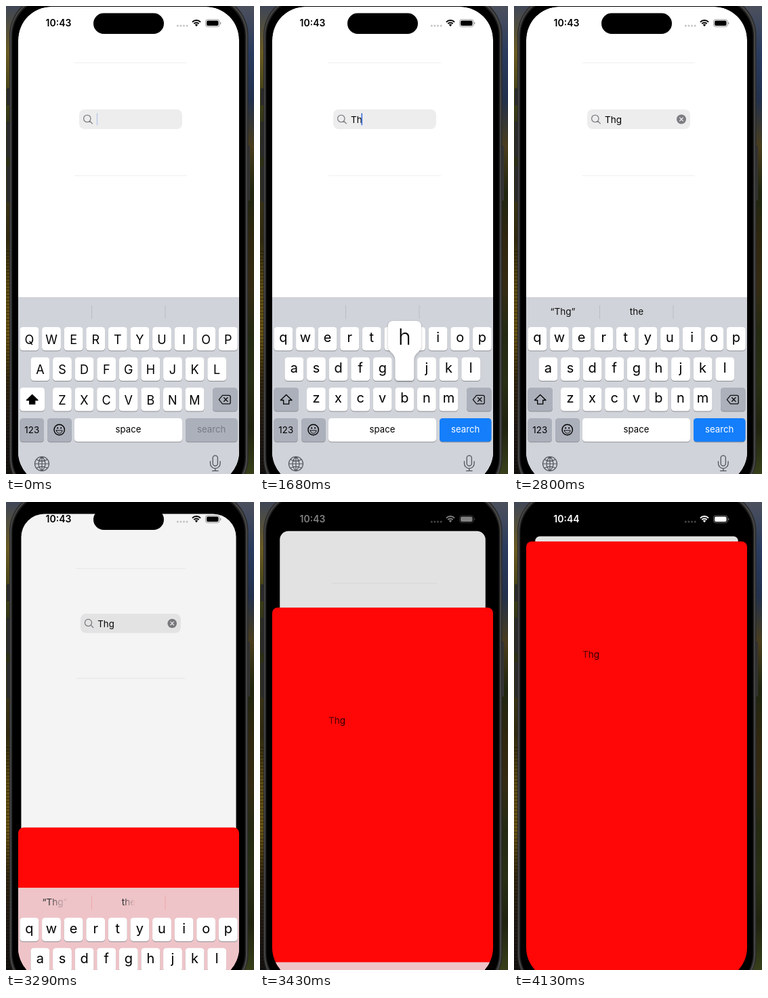
These frames come from a looping animation (366x688 px, 5.18 s). An HTML page with a canvas:

```html
<!DOCTYPE html>
<html lang="en">
<head>
<meta charset="utf-8">
<title>Search to sheet</title>
<style>
  html, body { margin: 0; width: 100%; height: 100%; overflow: hidden; background: #000; }
  canvas { display: block; width: 366px; height: 688px; }
</style>
</head>
<body>
<canvas id="stage"></canvas>
<script>
const W = 366, H = 688, LOOP = 5180, STEP = 70;
const canvas = document.getElementById('stage');
const g = canvas.getContext('2d');
const dpr = window.devicePixelRatio || 1;
canvas.width = W * dpr;
canvas.height = H * dpr;

const SCREEN = { x: 18, y: 1, w: 326, h: 703, r: 49 };
const KEY_W = 27.8, KEY_H = 34.5, PITCH = 32.6;
const ROWS = [['QWERTYUIOP', 20.5, 472], ['ASDFGHJKL', 36.5, 516.5], ['ZXCVBNM', 69, 561]];
const CURSOR = [[0, .25], [350, 0], [700, .7], [770, .85], [840, 1], [1120, .9], [1330, 1],
  [2590, .75], [2660, .5], [2730, .25], [2800, 0], [3010, .4], [3080, 1], [3220, 0]];

const clamp = v => Math.min(1, Math.max(0, v));
const ramp = (t, from, to) => clamp((t - from) / (to - from));

// Critically damped spring from 0 to 1.
function spring(t, start) {
  if (t >= 3780) return 1;
  const x = Math.max(0, t - start) * .01535;
  return 1 - (1 + x) * Math.exp(-x);
}

// Value of the last step that has begun.
const stepped = (steps, t) => steps.filter(s => s[0] <= t).pop()[1];

function rect(x, y, w, h, color, r = 0) {
  g.fillStyle = color;
  g.beginPath();
  g.roundRect(x, y, w, h, r);
  g.fill();
}

function disc(x, y, r, color) {
  g.fillStyle = color;
  g.beginPath();
  g.arc(x, y, r, 0, 7);
  g.fill();
}

function text(str, x, y, size, color, align = 'center', weight = 400) {
  g.font = `${weight} ${size}px Inter, sans-serif`;
  g.textAlign = align;
  g.fillStyle = color;
  g.fillText(str, x, y);
}

function stroke(path, color, width) {
  g.strokeStyle = color;
  g.lineWidth = width;
  g.lineCap = g.lineJoin = 'round';
  g.stroke(new Path2D(path));
}

function gradient(x0, y0, x1, y1, colors) {
  const fill = g.createLinearGradient(x0, y0, x1, y1);
  colors.forEach((c, i) => fill.addColorStop(i / (colors.length - 1), c));
  return fill;
}

function drawBackdrop() {
  rect(0, 0, 183, H, gradient(0, 0, 0, H, ['#3f4656', '#6a5a22', '#3f3f18', '#272d14', '#3a3417',
    '#30290f', '#5f4d14', '#6b5515', '#33270f', '#221a14', '#15120f']));
  rect(183, 0, 183, H, gradient(0, 0, 0, H, ['#4c505c', '#293b5f', '#22304c', '#4a3d1c', '#20260f',
    '#30270f', '#352b13', '#242a12', '#282f14', '#20230f', '#37401a']));
  for (let y = 360; y < H; y += 5) rect(0, y, 6, 1.5, 'rgba(0,0,0,.35)');
}

function drawPhone() {
  for (const [y, h] of [[121, 25], [170, 52], [236, 52]]) rect(1, y, 6, h, '#2b2b2b', 1);
  rect(354, 205, 6, 81, '#343434', 1);
  rect(5, -16, 352.5, 740, '#292929', 59);
  rect(6.2, -14.8, 350, 738, '#454545', 58);
  rect(8, -13, 346, 734, '#1d1d1d', 57);
  rect(9.5, -11, 343, 730, '#000', 56);
}

function drawCard(t, p) {
  const s = 1 - .082 * p, radius = SCREEN.r - 42 * p;
  g.save();
  g.translate(181, 1 + 49.5 * p);
  g.scale(s, s);
  g.translate(-181, -1);
  g.save();
  rect(18, 1, 326, 720, '#fff', radius);
  g.clip();
  rect(101, 83, 166, 1, '#efefef');
  rect(101, 249, 166, 1, '#efefef');
  rect(108, 152, 152, 29, '#ededee', 8);
  stroke('M125 165.5a5.2 5.2 0 1 0-10.4 0a5.2 5.2 0 1 0 10.4 0M123.7 169.3l3.6 3.5', '#7f7f84', 1.3);

  const typed = stepped([[0, ''], [1680, 'Th'], [2240, 'Thg']], t);
  text(typed, 134, 172, 13.6, '#000', 'left');
  g.globalAlpha = stepped(CURSOR, t);
  rect(133.7 + [0, 0, 15.8, 24][typed.length], 157.5, 1.6, 18, '#3a70dc', .8);
  g.globalAlpha = ramp(t, 1750, 1890);
  disc(247, 166.5, 7, '#7d7d82');
  stroke('M244.6 164.1l4.8 4.8M249.4 164.1l-4.8 4.8', '#f2f2f3', 1.3);
  g.globalAlpha = Math.min(.115, .135 * p);
  rect(18, 1, 326, 720, '#000');
  g.restore();
  g.restore();
}

function drawSheet(top) {
  rect(18, top, 326, H + 40 - top, '#ff0706', [8, 8, 0, 0]);
  text('Thg', 101, top + 170.6, 13.6, gradient(101, 0, 126, 0, ['#7a0404', '#300202', '#280202']), 'left');
}

function drawKey(x, y, w, color = '#fff') {
  rect(x, y + 1, w, KEY_H, '#8b8d92', 4.5);
  rect(x, y, w, KEY_H, color, 4.5);
}

function drawPopup(letter, x, y) {
  const cx = x + KEY_W / 2, half = KEY_W / 2, top = y - 53.5, bottom = y + KEY_H;
  g.save();
  g.shadowColor = 'rgba(0,0,0,.28)';
  g.shadowBlur = 3;
  g.shadowOffsetY = 1;
  g.fillStyle = '#fff';
  g.beginPath();
  g.moveTo(cx - 18, top);
  g.arcTo(cx + 24.5, top, cx + 24.5, y, 7);
  g.lineTo(cx + 24.5, y - 17);
  g.bezierCurveTo(cx + 24.5, y - 6, cx + half, y - 8, cx + half, y + 5);
  g.arcTo(cx + half, bottom, cx, bottom, 4.5);
  g.arcTo(cx - half, bottom, cx - half, y, 4.5);
  g.lineTo(cx - half, y + 5);
  g.bezierCurveTo(cx - half, y - 8, cx - 24.5, y - 6, cx - 24.5, y - 17);
  g.arcTo(cx - 24.5, top, cx, top, 7);
  g.fill();
  g.restore();
  text(letter, cx, y - 18.5, 32, '#000', 'center', 300);
}

function drawPredictions(t) {
  const leaving = t >= 3220;
  const ink = (x0, x1) => leaving
    ? gradient(x0, 0, x1, 0, ['#222', '#333', '#a68e93', '#f0bcc0']) : '#111';
  const divider = leaving ? '#f0a5aa' : '#b9bdc4';
  rect(126, 440, 1, 20, divider);
  rect(234.5, 440, 1, 20, divider);
  g.globalAlpha = ramp(t, 1890, 2100);
  text(t < 2380 ? '“Th”' : '“Thg”', 72, 454, 13.6, ink(52, 92));
  text('the', 181, 454, 13.6, ink(167, 190));
  g.globalAlpha = 1;
}

function drawIcons(upper) {
  const arrow = 'M38.7 571.5l8.3 8h-4.3v5.7h-8v-5.7h-4.3z';
  stroke(arrow, '#000', 1.3);
  if (upper) {
    g.fillStyle = '#000';
    g.fill(new Path2D(arrow));
  }
  stroke('M319.5 572.3h9.5q2.2 0 2.2 2.2v8.2q0 2.2-2.2 2.2h-9.5l-5.2-6.3z'
    + 'M321.6 575.8l5.4 5.5M327 575.8l-5.4 5.5', '#111', 1.3);

  stroke('M86.4 623a7.7 7.7 0 1 0-15.4 0a7.7 7.7 0 1 0 15.4 0', '#000', 1.4);
  disc(76.2, 620.4, 1.1, '#000');
  disc(81.2, 620.4, 1.1, '#000');
  stroke('M74.2 624h9q-.8 4.2-4.5 4.2t-4.5-4.2z', '#000', .9);

  const grey = '#52565d';
  stroke('M63.5 673a10.5 10.5 0 1 0-21 0a10.5 10.5 0 1 0 21 0M42.5 673h21M53 662.5v21'
    + 'M53 662.5q-10 10.5 0 21q10-10.5 0-21M45 666.7q8 4.4 16 0M45 679.3q8-4.4 16 0', grey, 1.2);
  stroke('M305.2 664.4a3.6 3.6 0 0 1 7.2 0v8a3.6 3.6 0 0 1-7.2 0z'
    + 'M301.5 669.5v3a7.3 7.3 0 0 0 14.6 0v-3M308.8 680v3.3M304.5 683.3h8.6', grey, 1.3);
}

function drawKeyboard(t, offset, sheetTop) {
  const upper = t < 1680;
  const pressed = stepped([[0, ''], [1330, 'T'], [1680, 'H'], [1820, ''], [2100, 'G'], [2240, '']], t);
  const top = 428 + offset;
  rect(18, top, 326, 300, '#d0d3d9');
  if (sheetTop < H) rect(18, Math.max(top, sheetTop), 326, 300, '#eec4c8');

  g.save();
  g.translate(0, offset);
  drawPredictions(t);
  let popup = null;
  for (const [letters, left, y] of ROWS) {
    [...letters].forEach((letter, i) => {
      const x = left + i * PITCH, label = upper ? letter : letter.toLowerCase();
      drawKey(x, y, KEY_W);
      text(label, x + KEY_W / 2, y + (upper ? 24.6 : 22.4), upper ? 18 : 20, '#000');
      if (letter === pressed) popup = [label, x, y];
    });
  }
  const dark = '#abb0bb';
  drawKey(20.5, 561, 36.5, upper ? '#fff' : dark);
  drawKey(305, 561, 36.5, dark);
  drawKey(20.5, 606, 35.5, dark);
  drawKey(61, 606, 35.8, dark);
  drawKey(101, 606, 159, '#fff');
  text('123', 38.3, 627.6, 13.4, '#000');
  text('space', 180.5, 626.8, 13.2, '#000');
  const held = t >= 3010 && t < 3220;
  drawKey(265, 606, 76.5, upper ? dark : held ? '#fff' : '#147efb');
  text('search', 303.2, 626.8, 13.2, upper ? '#777b83' : held ? '#000' : '#fff');
  drawIcons(upper);
  if (popup) drawPopup(...popup);
  g.restore();
}

function drawStatus(t) {
  const light = ramp(t, 3360, 3500);
  const level = Math.round(255 * light);
  const color = `rgb(${level},${level},${level})`;
  text(t < 4130 ? '10:43' : '10:44', 77.5, 30.3, 14, color, 'center', 600);
  for (let i = 0; i < 4; i++) disc(253.3 + i * 4.6, 29, 1.5, light ? '#454545' : '#c4c4c4');

  g.strokeStyle = color;
  g.lineWidth = 2;
  g.lineCap = 'butt';
  for (const r of [5.2, 8.6]) {
    g.beginPath();
    g.arc(281, 29.7, r, -Math.PI * .75, -Math.PI * .25);
    g.stroke();
  }
  g.fillStyle = color;
  g.beginPath();
  g.moveTo(281, 30.3);
  g.arc(281, 29.7, 3, -Math.PI * .75, -Math.PI * .25);
  g.fill();

  g.globalAlpha = .4;
  g.lineWidth = 1;
  g.beginPath();
  g.roundRect(294.5, 20, 20.5, 10.5, 3.2);
  g.stroke();
  rect(316, 23.6, 1.3, 3.4, color, 1);
  g.globalAlpha = 1;
  rect(296, 21.5, 17.5, 7.5, color, 2);
}

function draw(t) {
  g.setTransform(dpr, 0, 0, dpr, 0, 0);
  drawBackdrop();
  drawPhone();

  const p = spring(t, 3212.7);
  const sheetTop = H - 630 * p;
  const { x, y, w, h, r } = SCREEN;
  g.save();
  rect(x, y, w, h, '#000', r);
  g.clip();
  drawCard(t, p);
  if (p > 0) drawSheet(sheetTop);
  const offset = 278 * spring(t, 3180.5);
  if (offset < 260) drawKeyboard(t, offset, sheetTop);
  g.restore();

  rect(129, 10.5, 104, 30.5, '#000', 15.2);
  drawStatus(t);
}

const start = performance.now();
function tick() {
  const t = (performance.now() - start) % LOOP;
  draw(Math.floor(t / STEP) * STEP);
  requestAnimationFrame(tick);
}
tick();
</script>
</body>
</html>
```
